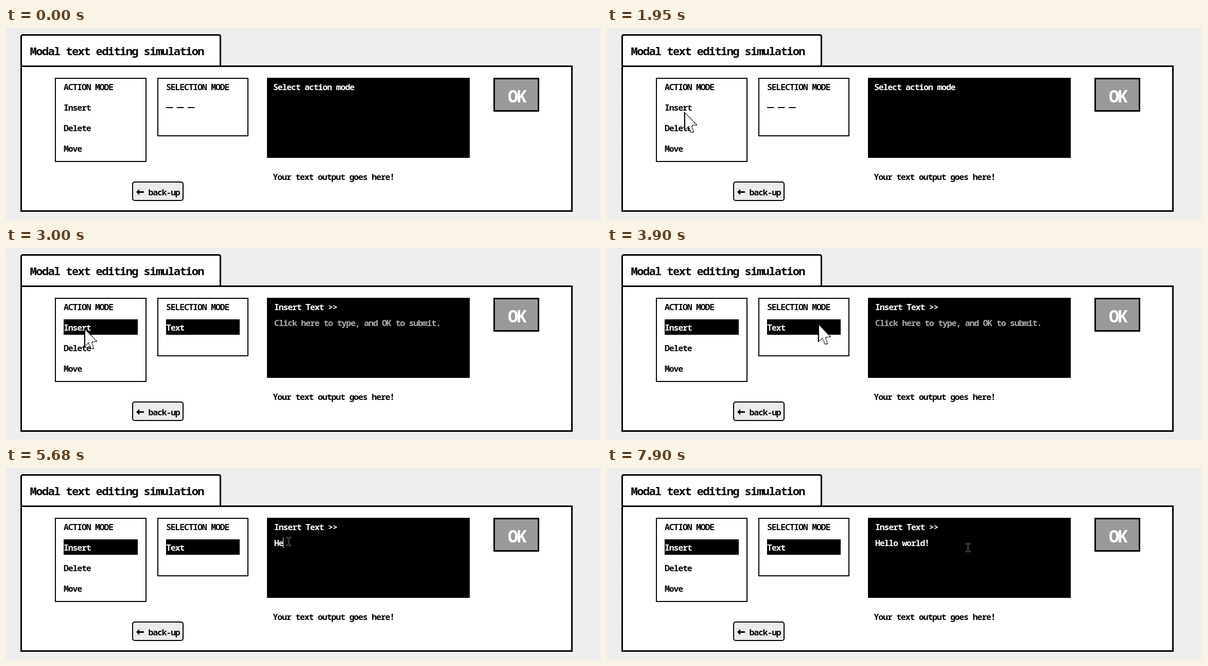
Animation, 1156 px wide and 374 px high, one loop 8000 ms. Source, as an HTML page with a canvas:

```html
<!DOCTYPE html>
<html lang="en">
<head>
<meta charset="utf-8">
<title>Modal text editing simulation</title>
<style>
html, body { margin: 0; width: 100%; height: 100%; overflow: hidden; background: #fff; }
canvas { display: block; }
</style>
</head>
<body>
<canvas id="stage" width="1156" height="374"></canvas>
<script>
const ctx = document.getElementById('stage').getContext('2d');
const FAMILY = '"Noto Sans Mono", "DejaVu Sans Mono", monospace';
const LOOP = 8000;
const STEP = 150;
const BODY = 16.5;
const PITCH = 0.529; // letter advance in em
const ROW = 40;
const CONSOLE_X = 507;
const INPUT_X = 521;
const MESSAGE = 'Hello world!';

const SELECT_AT = 3000;
const FOCUS_AT = 4490;
const FIRST_KEY = 5090;
const TYPING_AT = 5540;
const KEY_GAP = 144.5;
const LAST_KEY = 7310;
const BLINK = 450;

const easeOut = u => 1 - (1 - u) ** 1.73;
const easeInOut = u => u * u * (3 - 2 * u);
const linear = u => u;

// The pointer glides from one stop to the next and rests in between.
const ENTRY = { x: 5, y: 344, at: 750 };
const MOVES = [
  { start: 750, end: 1650, x: 141, y: 164, ease: easeOut },
  { start: 1650, end: 2100, x: 154, y: 164, ease: linear },
  { start: 2400, end: 2550, x: 152, y: 157, ease: linear },
  { start: 3450, end: 4200, x: 549.5, y: 143, ease: easeInOut },
  { start: 7750, end: 7900, x: 701.5, y: 155, ease: linear }
];

function dotPattern() {
  const tile = document.createElement('canvas');
  tile.width = tile.height = 2;
  const t = tile.getContext('2d');
  t.fillStyle = '#fff';
  t.fillRect(0, 0, 2, 2);
  t.fillStyle = '#bbb';
  t.fillRect(0, 0, 1, 1);
  return ctx.createPattern(tile, 'repeat');
}
const dots = dotPattern();

function fill(x, y, w, h, color = '#000') {
  ctx.fillStyle = color;
  ctx.fillRect(x, y, w, h);
}

// Outer edges of the box; the border lies inside them.
function box(x, y, w, h, line, color = '#fff', radius = 0) {
  ctx.beginPath();
  ctx.roundRect(x + line / 2, y + line / 2, w - line, h - line, radius);
  ctx.fillStyle = color;
  ctx.fill();
  ctx.lineWidth = line;
  ctx.strokeStyle = '#000';
  ctx.stroke();
}

function text(str, x, y, { size = BODY, weight = 600, color = '#000' } = {}) {
  ctx.fontStretch = 'semi-condensed';
  ctx.font = `${weight} ${size}px ${FAMILY}`;
  ctx.letterSpacing = '0px';
  ctx.letterSpacing = `${size * PITCH - ctx.measureText('M').width}px`;
  ctx.fillStyle = color;
  ctx.fillText(str, x, y);
}

const white = { weight: 700, color: '#fff' };

function drawWindow() {
  fill(0, 0, 1156, 374, dots);
  box(28, 73, 1073, 285, 3);
  box(28, 12, 390, 64, 3, '#fff', 3);
  text('Modal text editing simulation', 46.5, 52.5, { size: 22 });

  box(947, 97, 89, 66, 3, '#999');
  text('OK', 975, 145, { size: 33.5, ...white });

  box(245, 299, 100, 38, 2, '#ebebee', 4);
  fill(258, 318, 10, 3);
  ctx.fill(new Path2D('M253 319.5l6-6v12z'));
  text('back-up', 276.5, 325.5);
  text('Your text output goes here!', 518.5, 295.5);
}

function drawList(x, width, title, items, selected) {
  box(x, 97, width, 164 - (items.length === 1 ? 50 : 0), 2);
  const left = x + 17;
  text(title, left, 120.5);
  items.forEach((item, i) => {
    const base = 120.5 + ROW * (i + 1);
    const active = selected && i === 0;
    if (active) fill(left, base - 21.5, width - 34, 30);
    if (item) text(item, left, base, active ? white : {});
    else for (let n = 0; n < 3; n++) fill(left + n * 21, base - 6.5, 13.5, 2);
  });
}

function typedCount(t) {
  if (t < FIRST_KEY) return 0;
  if (t < TYPING_AT) return 1;
  if (t >= LAST_KEY) return MESSAGE.length;
  return Math.min(MESSAGE.length - 1, 2 + Math.floor((t - TYPING_AT) / KEY_GAP));
}

function drawConsole(t, selected) {
  fill(CONSOLE_X, 97, 394, 156);
  if (!selected) {
    text('Select action mode', 519, 120.5, white);
    return;
  }
  text('Insert Text >>', INPUT_X, 120.5, white);

  const count = typedCount(t);
  if (count) text(MESSAGE.slice(0, count), INPUT_X, 151.5, white);
  else text('Click here to type, and OK to submit.', INPUT_X, 151.5, { weight: 700, color: '#aaa' });

  const waiting = t >= FOCUS_AT && t < FOCUS_AT + BLINK;
  const typing = t >= FIRST_KEY && t < LAST_KEY + BLINK - 10;
  if (waiting || typing) fill(Math.round(INPUT_X + count * BODY * PITCH), 135, 1, 21, '#fff');
}

function drawArrow(x, y) {
  const shape = new Path2D('M0 0V35L8 28L13 39H18L14 26L24 25Z');
  ctx.save();
  ctx.translate(x + 0.5, y);
  ctx.fillStyle = '#fff';
  ctx.fill(shape);
  ctx.lineWidth = 1.8;
  ctx.strokeStyle = '#000';
  ctx.setLineDash([2, 1.5]);
  ctx.stroke(shape);
  ctx.restore();
  fill(x, y, 2, 35);
}

function drawBeam(x, y) {
  const shape = new Path2D('M-3-7.5H3M0-7.5V7.5M-3 7.5H3');
  ctx.save();
  ctx.translate(x, y);
  ctx.lineCap = 'square';
  ctx.lineWidth = 3;
  ctx.strokeStyle = '#777';
  ctx.stroke(shape);
  ctx.lineWidth = 1.4;
  ctx.strokeStyle = '#000';
  ctx.stroke(shape);
  ctx.restore();
}

function pointerAt(t) {
  let { x, y } = ENTRY;
  for (const move of MOVES) {
    if (t < move.start) break;
    const elapsed = Math.floor((t - move.start) / STEP) * STEP;
    const u = move.ease(Math.min(1, elapsed / (move.end - move.start)));
    x += (move.x - x) * u;
    y += (move.y - y) * u;
  }
  return { x, y };
}

function drawPointer(t) {
  if (t < ENTRY.at) return;
  const { x, y } = pointerAt(t);
  if (x > CONSOLE_X) drawBeam(x, y);
  else drawArrow(Math.round(x), Math.round(y));
}

function frame() {
  const t = performance.now() % LOOP;
  const selected = t >= SELECT_AT;
  drawWindow();
  drawList(95, 178, 'ACTION MODE', ['Insert', 'Delete', 'Move'], selected);
  drawList(294, 177, 'SELECTION MODE', [selected ? 'Text' : ''], selected);
  drawConsole(t, selected);
  drawPointer(t);
  requestAnimationFrame(frame);
}
frame();
</script>
</body>
</html>
```
